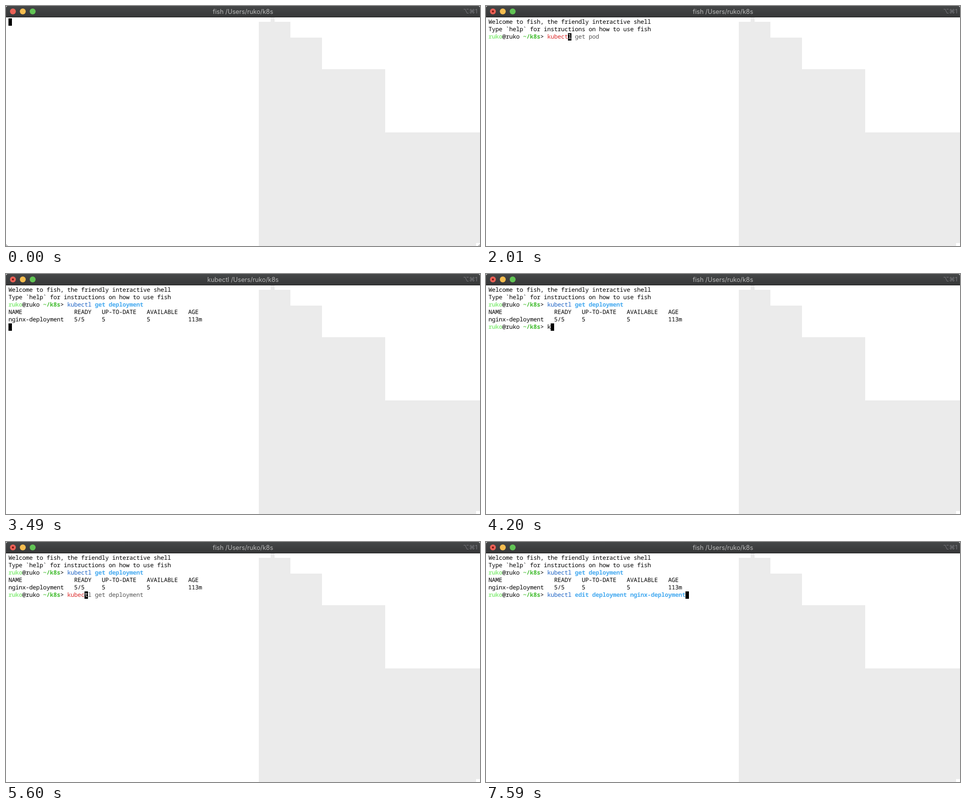
Recreate the animation shown at these times as an HTML page. Size 960x486 px, loop 8000 ms.

```html
<!DOCTYPE html>
<html lang="en">
<head>
<meta charset="utf-8">
<title>Terminal session</title>
<style>
html, body { margin: 0; width: 100%; height: 100%; overflow: hidden; background: #fff; }
#stage { position: relative; width: 960px; height: 486px; overflow: hidden; }
svg { position: absolute; left: 0; top: 0; }
#bar { position: absolute; width: 960px; height: 22px; border-bottom: 1px solid #1e1e1e;
  background: linear-gradient(#454748, #363738); border-radius: 4px 4px 0 0;
  font: 12.7px/23px Inter, sans-serif; color: #b9b9b9; text-align: center; }
#keys { position: absolute; right: 5px; top: -1px; font: 12px/23px Inter, "DejaVu Sans", sans-serif; color: #77777c; }
#screen, #cursor { position: absolute; margin: 0; text-rendering: geometricPrecision;
  font: 500 12px/15px "Noto Sans Mono", monospace; letter-spacing: -.2px; white-space: pre; }
#screen { left: 5px; top: 24px; color: #000; }
#cursor { width: 7px; height: 15px; line-height: 13px; background: #000; color: #fff; }
b { font-weight: 700; }
.user { color: #90ee84; }
.path { color: #45bd33; }
.bad { color: #dc2a2a; }
.cmd { color: #1d63c4; }
.arg { color: #45aaf0; }
.hint { color: #555; }
</style>
</head>
<body>
<div id="stage">
  <svg width="960" height="486">
    <path fill="#ebebeb" d="M536 23h8v9h32v32h64v64h128v128h192v224h-8v6H512V32h24z"/>
    <path id="corners" fill="none" stroke="#777" d="M0 482.5Q.5 485.5 3.5 486M960 482.5Q959.5 485.5 956.5 486"/>
  </svg>
  <div id="bar"><span id="title"></span><span id="keys">⌥⌘1</span></div>
  <svg width="70" height="22">
    <circle cx="14" cy="11" r="6" fill="#ea6156"/>
    <circle id="dot" cx="14" cy="11" r="2" fill="#7d1510"/>
    <circle cx="34" cy="11" r="6" fill="#f5bd4f"/>
    <circle cx="54" cy="11" r="6" fill="#61c454"/>
  </svg>
  <pre id="screen"></pre>
  <div id="cursor"></div>
</div>
<script>
const $ = id => document.getElementById(id);
const LOOP = 8000, USER = 'ruko', ENTER = 3320, READY = 3510;
const POD = 'kubectl get pod', GET = 'kubectl get deployment';
const EDIT = 'kubectl edit deployment nginx-deployment';

// [time, line being typed, typed length, suggestion shown]
const keys = [
  [1270, POD, 1, 0], [1355, POD, 2, 1], [1440, POD, 3, 1], [1650, POD, 4, 1], [1830, POD, 5, 1],
  ...[6, 7, 8, 9, 10, 11, 12].map(n => [1410 + n * 100, POD, n, 1]),
  [2820, GET, 13, 0], [2970, GET, 14, 1], [3000, GET, 15, 1], [3170, GET, 22, 0],
  [READY, '', 0, 0],
  [4200, GET, 1, 0], [4280, GET, 2, 1], [4360, GET, 3, 1], [4680, GET, 4, 1],
  [5020, GET, 3, 1], [5160, GET, 2, 0], [5255, GET, 3, 1], [5350, GET, 4, 1], [5600, GET, 5, 1],
  [5980, GET, 4, 0], [6370, GET, 5, 0], [6590, GET, 6, 1], [6690, GET, 7, 1], [6900, GET, 8, 1],
  [7080, EDIT, 9, 0], [7250, EDIT, 10, 1], [7350, EDIT, 11, 1], [7590, EDIT, 40, 0]
];

const welcome = 'Welcome to fish, the friendly interactive shell\nType `help` for instructions on how to use fish\n';
const output = 'NAME               READY   UP-TO-DATE   AVAILABLE   AGE\n' +
               'nginx-deployment   5/5     5            5           113m\n';
const prompt = `<b class="user">${USER}</b>@${USER} <b class="path">~/k8s</b>&gt; `;

function commandLine(line, n, hint) {
  const kind = n < 2 ? '' : n < 8 ? 'bad' : 'cmd';
  return `${prompt}<span class="${kind}">${line.slice(0, Math.min(n, 7))}</span>` +
    `<b class="arg">${line.slice(7, Math.max(n, 7))}</b>`.repeat(n > 7) +
    (hint ? `<span class="hint">${line.slice(n)}</span>` : '');
}

function view(t) {
  if (t < 210) return { text: '', row: 0, col: 0 };
  if (t < 320) return { text: welcome, row: 2, col: 0 };
  const [, line, n, hint] = keys.findLast(k => k[0] <= t) || [0, '', 0, 0];
  const current = commandLine(line, n, hint);
  const at = { col: 17 + n, under: hint ? line[n] : '' };
  if (t < ENTER) return { text: welcome + current, row: 2, ...at };
  const done = welcome + commandLine(GET, GET.length, 0) + '\n';
  if (t < 3447) return { text: done, row: 3, col: 0 };
  if (t < READY) return { text: done + output, row: 5, col: 0 };
  return { text: done + output + current, row: 5, ...at };
}

let shown;
function draw(now) {
  const t = now % LOOP;
  const { text, row, col, under = '' } = view(t);
  if (text !== shown) $('screen').innerHTML = shown = text;
  $('cursor').style.left = 5 + col * 7 + 'px';
  $('cursor').style.top = 25 + row * 15 + 'px';
  $('cursor').textContent = under;
  $('title').textContent = `${t >= 3383 && t < READY ? 'kubectl' : 'fish'} /Users/${USER}/k8s`;
  $('dot').style.opacity = t < 100 ? 0 : 1;
  $('corners').style.opacity = t < 100 ? 1 : 0;
  requestAnimationFrame(draw);
}
draw(performance.now());
</script>
</body>
</html>
```
